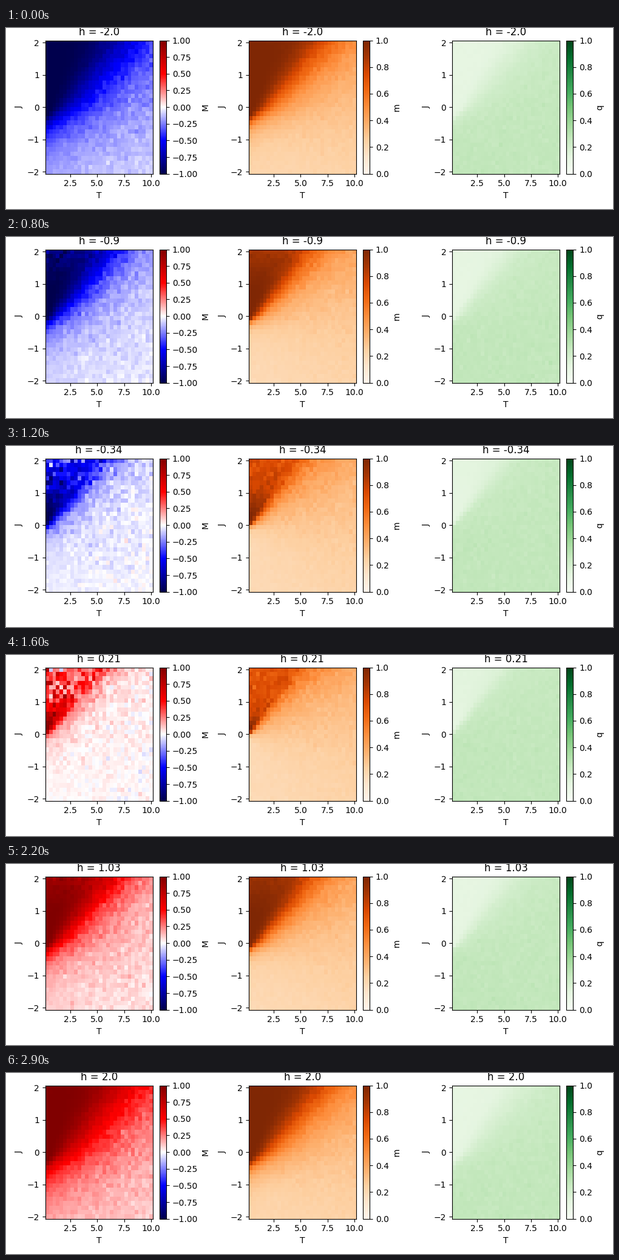
Animation, 1000 px wide and 300 px high, one loop 3 s. Source, as a matplotlib script:

```python
import numpy as np
import matplotlib.pyplot as plt
from matplotlib.animation import FuncAnimation

STEPS = 30

temps = np.linspace(0, 10, STEPS + 1)[1:]
couplings = np.linspace(-2, 2, STEPS)
fields = np.linspace(-2, 2, STEPS)
T, J = np.meshgrid(temps, couplings)


def mean_field(h):
    """Solve M = tanh((h + zJM) / T) for h > 0 by bisection."""
    zj = np.where(J > 0, 2.95, 5.0) * J
    low, high = np.zeros_like(T), np.ones_like(T)
    for _ in range(40):
        mid = (low + high) / 2
        rising = np.tanh((h + zj * mid) / T) > mid
        low, high = np.where(rising, mid, low), np.where(rising, high, mid)
    return (low + high) / 2


def lattice_state(frame):
    """Return global magnetisation, local magnetisation and local disorder."""
    h = fields[frame]
    rng = np.random.default_rng(100 + frame)

    def noise(scale):
        return scale * rng.standard_normal(T.shape)

    order = mean_field(abs(h))
    # A weak field leaves frozen domains behind when the coupling is strong.
    aligned = np.where(J > 0, np.tanh(2.8 * abs(h) / np.maximum(J, 1e-6)), 1)
    frozen = order * (1 - aligned)
    bond = np.tanh(J / T)
    background = np.minimum(0.195 + 0.085 * np.exp(4.2 * bond), 0.7)

    total = np.sign(h) * order * (1 - frozen)
    total += noise(0.22 * frozen * (1 + aligned))
    total += noise(0.035 * np.exp(np.minimum(bond, 0.4)) * (1 - order**2))

    local = background + (1 - background) * order**2 * aligned**3
    local += noise(0.15 * background**2 * (1 - local**2))

    ordered = background + (1 - background) * order**2
    disorder = 0.115 + 0.16 * (1 - ordered**2) + 0.03 * frozen
    disorder += noise(0.002 + 0.006 * (1 - ordered**2))
    return np.clip(total, -1, 1), np.clip(local, 0, 1), disorder


fig, axes = plt.subplots(1, 3, figsize=(10, 3), dpi=100)


def add_panel(ax, label, cmap, vmin, tick_step):
    mesh = ax.pcolormesh(temps, couplings, np.zeros_like(T), cmap=cmap,
                         vmin=vmin, vmax=1, shading="nearest")
    ax.set_xticks([2.5, 5, 7.5, 10])
    ax.set_yticks(range(-2, 3))
    ax.set_xlabel("T")
    ax.set_ylabel("J")
    ticks = np.arange(vmin, 1 + tick_step / 2, tick_step)
    fig.colorbar(mesh, ax=ax, label=label, ticks=ticks)
    return ax, mesh


panels = [
    add_panel(axes[0], "M", "seismic", -1, 0.25),
    add_panel(axes[1], "m", "Oranges", 0, 0.2),
    add_panel(axes[2], "q", "Greens", 0, 0.2),
]
# Titles come later, so the layout keeps no room for them.
fig.tight_layout()


def update(frame):
    for (ax, mesh), values in zip(panels, lattice_state(frame)):
        mesh.set_array(values)
        ax.set_title(f"h = {round(float(fields[frame]), 2)}")
    return [mesh for _, mesh in panels]


anim = FuncAnimation(fig, update, frames=STEPS, interval=100, repeat=True,
                     repeat_delay=0, blit=False)
plt.show()
```
